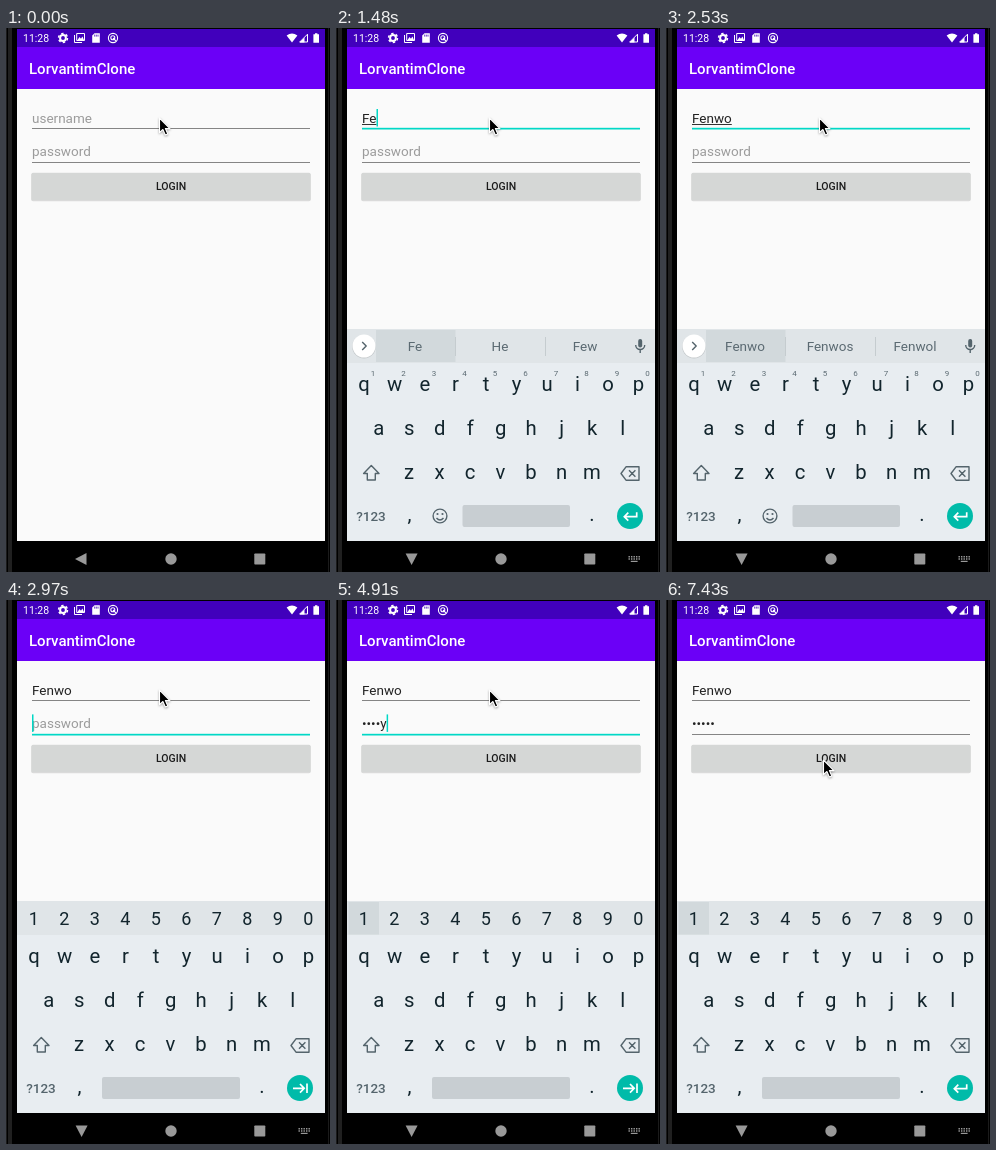
An HTML page that plays this animation: 324 by 544 pixels, repeating every 8 s.

```html
<!DOCTYPE html>
<html lang="en">
<head>
<meta charset="utf-8">
<title>Login form</title>
<style>
  html, body { margin: 0; width: 100%; height: 100%; overflow: hidden; background: #000; }
  svg { display: block; width: 324px; height: 544px; font-family: Roboto, sans-serif; }
  .mid { text-anchor: middle; }
  .key { font-size: 20.3px; fill: #12252d; text-anchor: middle; }
  .num { font-size: 18px; fill: #12252d; text-anchor: middle; }
  .sup { font-size: 8px; fill: #5b6a72; text-anchor: middle; }
  .word { font-size: 13.5px; fill: #5b6a72; text-anchor: middle; }
  .field { font-size: 13.5px; }
  .line { fill: none; stroke: #54646c; stroke-width: 1.4; stroke-linejoin: round; }
  #mouse { filter: drop-shadow(.5px 1px .8px rgba(0, 0, 0, .35)); }
</style>
</head>
<body>
<svg viewBox="0 0 324 544" xmlns="http://www.w3.org/2000/svg">
  <!-- device and bars -->
  <rect width="324" height="544" fill="#000"/>
  <path d="M.5 0V544M322.5 0V544" stroke="#1b1b1b"/>
  <rect x="2" width="4" height="544" fill="#202020"/>
  <rect x="11" y="1" width="308" height="512" fill="#fafafa"/>
  <rect x="11" y="1" width="308" height="18" fill="#4100bc"/>
  <rect x="11" y="19" width="308" height="42" fill="#6b00f7"/>
  <text x="23" y="46" font-size="15" font-weight="500" fill="#fff">LorvantimClone</text>

  <!-- status icons -->
  <g fill="#fff">
    <text x="17" y="14" font-size="10.5">11:28</text>
    <circle cx="57" cy="10" r="2.9" fill="none" stroke="#fff" stroke-width="2"/>
    <circle cx="57" cy="10" r="4.5" fill="none" stroke="#fff" stroke-width="1.4" stroke-dasharray="2.4 2.312"/>
    <path d="M68.5 7V14.5H76" fill="none" stroke="#fff"/>
    <path d="M70.7 5.5H78.5V12.5H70.7Z" fill="none" stroke="#fff"/>
    <path d="M71.5 12L73.5 9L75 10.7L76.4 8.5L78 12Z"/>
    <path d="M88.5 5.3H93.8V14.7H86.2V7.6Z"/>
    <path d="M88.7 6.6V8.6M90.3 6.6V8.6M92 6.6V8.6" stroke="#4100bc" stroke-width=".8"/>
    <g fill="none" stroke="#fff" stroke-width="1.1">
      <circle cx="107" cy="10" r="4.6"/>
      <circle cx="106.8" cy="9.8" r="2"/>
      <path d="M107 10L110.2 13.2"/>
    </g>
    <path d="M280.6 7.5Q286 3.4 291.4 7.5L286 14.5Z"/>
    <path d="M293.7 14L301.5 6.2V14Z" fill="none" stroke="#fff"/>
    <path d="M293.5 14.4L298.5 9.4V14.4Z"/>
    <path d="M309 5.2H311.4V6.2H313V14.7H307.4V6.2H309Z"/>
  </g>

  <!-- form -->
  <rect id="userLine" x="26" width="278"/>
  <rect id="passLine" x="26" width="278"/>
  <text id="user" class="field" x="26" y="94.6"/>
  <text id="pass" class="field" x="26" y="128"/>
  <rect id="compose" x="26" y="96" height="1" fill="#333"/>
  <rect id="caret" width="1.5" height="17.5" fill="#00d8c6"/>
  <rect x="25.2" y="145.3" width="279.6" height="28" rx="1.8" fill="#000" opacity=".13"/>
  <rect id="button" x="25.5" y="144.7" width="279" height="27.5" rx="1.5"/>
  <text class="mid" x="165" y="162" font-size="10.5" font-weight="500" fill="#1b1b1b">LOGIN</text>

  <!-- keyboard -->
  <g id="board">
    <rect x="11" y="301" width="308" height="212" fill="#e8edf1"/>
    <rect x="11" y="301" width="308" height="34" fill="#e0e5e8"/>
    <g id="words">
      <rect x="40" y="302" width="79.5" height="32" fill="#d2d9dc"/>
      <path d="M119.5 309V328M209.5 309V328" stroke="#c5cccf"/>
      <circle cx="28" cy="318.7" r="11.8" fill="#000" opacity=".12"/>
      <circle cx="28" cy="318" r="11.5" fill="#fff"/>
      <path class="line" d="M26.2 314L30.2 318L26.2 322"/>
      <rect x="302.2" y="311" width="4" height="8.5" rx="2" fill="#54646c"/>
      <path class="line" d="M299.7 317A4.5 4.5 0 0 0 308.7 317M304.2 321.5V325"/>
    </g>
    <g id="nums"><rect id="one" x="12.5" y="302" width="30.5" height="32.5" fill="#d2d9dc"/></g>
    <g id="keys"></g>
    <path class="line" d="M35.3 437.5L43 445.5H39.3V452H31.3V445.5H27.6Z"/>
    <path class="line" d="M285 445.5L290 438.8H303V452.2H290ZM293 442.3L299.4 448.7M299.4 442.3L293 448.7"/>
    <text class="mid" x="35" y="493" font-size="13.5" font-weight="500" fill="#54646c">?123</text>
    <text class="key" x="73.5" y="493">,</text>
    <text class="key" x="256" y="493">.</text>
    <g id="smile">
      <circle class="line" cx="104" cy="488" r="6.9"/>
      <path class="line" d="M100.5 490Q104 494 107.5 490"/>
      <circle cx="101.5" cy="486" r="1.1" fill="#54646c"/>
      <circle cx="106.5" cy="486" r="1.1" fill="#54646c"/>
    </g>
    <rect id="space" y="477" height="22" rx="2" fill="#c8ced2"/>
    <circle cx="294" cy="488" r="13" fill="#00bba9"/>
    <path id="action" fill="none" stroke="#fff" stroke-width="1.7"/>
  </g>

  <!-- navigation bar -->
  <g fill="#999">
    <path id="back" d="M69 531L80.5 525V537Z"/>
    <circle cx="165" cy="531" r="5.7"/>
    <rect x="248.3" y="525.5" width="11" height="11" rx=".8"/>
    <g id="picker">
      <path d="M292.5 528.7H304M292.5 531H304" stroke="#999" stroke-width="1.4" stroke-dasharray="1.4 1.1"/>
      <path d="M294.8 533.4H301.6" stroke="#999" stroke-width="1.2"/>
    </g>
  </g>

  <path id="mouse" d="M0 0V14.6L3.4 11.5L5.8 17L8.3 15.9L5.9 10.6H10.4Z" fill="#000" stroke="#fff" stroke-width="1.1" stroke-linejoin="round"/>
</svg>
<script>
const LOOP = 8000;
const $ = id => document.getElementById(id);

function label(parent, cls, x, y, str) {
  const el = document.createElementNS("http://www.w3.org/2000/svg", "text");
  el.setAttribute("class", cls);
  el.setAttribute("x", x);
  el.setAttribute("y", y);
  el.textContent = str;
  parent.append(el);
  return el;
}

function set(id, attrs) {
  for (const k in attrs) $(id).setAttribute(k, attrs[k]);
}

function show(id, on) {
  $(id).style.display = on ? "" : "none";
}

// keyboard letters and digits
const STEP = 30.5;
[["qwertyuiop", 28, 363], ["asdfghjkl", 42.7, 407], ["zxcvbnm", 73, 451]].forEach(([row, x, y]) =>
  [...row].forEach((c, i) => label($("keys"), "key", x + i * STEP, y, c)));
[..."1234567890"].forEach((c, i) => {
  label($("nums"), "num", 27.7 + i * STEP, 325, c);
  label($("words"), "sup", 37 + i * STEP, 348, c);
});
const hints = [79, 164, 249].map(x => label($("words"), "word", x, 323, ""));

// each cue changes part of the state and holds until the next
const cues = [
  [0, { user: "", pass: "", focus: "", caret: false, mode: "", picker: false, one: false, button: "#d5d7d6" }],
  [590, { focus: "user", caret: true }],
  [1040, { caret: false }],
  [1190, { picker: true }],
  [1330, { caret: true }],
  [1480, { user: "Fe", mode: "words", words: ["Fe", "He", "Few"] }],
  [1630, { user: "Fen", words: ["Fen", "Hen", "Fenwo"] }],
  [1780, { user: "Fenw", words: ["Fenw", "Fen", "Fenwo"] }],
  [2080, { user: "Fenwo", words: ["Fenwo", "Fenwos", "Fenwol"] }],
  [2530, { caret: false }],
  [2970, { focus: "pass", caret: true, mode: "nums" }],
  [3570, { caret: false }],
  [4020, { caret: true, one: true }],
  [4170, { pass: "d" }],
  [4470, { pass: "•i" }],
  [4620, { pass: "••l" }],
  [4770, { pass: "•••w" }],
  [4910, { pass: "••••y" }],
  [5360, { caret: false }],
  [5510, { pass: "•••••", focus: "login", button: "#c4c6c5" }],
  [7290, { button: "#cccecd" }],
  [7430, { button: "#d5d7d6" }]
];

function field(id, hint, value, focused, y) {
  const el = $(id);
  el.textContent = value || hint;
  el.setAttribute("fill", value ? "#222" : "#9b9b9b");
  set(id + "Line", focused
    ? { y: y - 0.2, height: 1.7, fill: "#00d8c6" }
    : { y, height: 1, fill: "#858585" });
  return value ? el.getComputedTextLength() : 0;
}

function pointer(t) {
  if (t < 6110) return [153.5, 90];
  const p = Math.min(1, Math.floor((t - 6110) / 147) / 7);
  const e = p * p * (3 - 2 * p);
  return [153.5 + 4 * e, 104.5 + 55.5 * e];
}

function draw(t) {
  const s = {};
  for (const [at, change] of cues) if (at <= t) Object.assign(s, change);

  const onUser = s.focus === "user", onPass = s.focus === "pass";
  const userEnd = field("user", "username", s.user, onUser, 100);
  const passEnd = field("pass", "password", s.pass, onPass, 134);
  set("caret", { x: 26 + (onUser ? userEnd : passEnd), y: onUser ? 81 : 114.4 });
  show("caret", s.caret);
  set("compose", { width: userEnd });
  show("compose", onUser && s.user);
  set("button", { fill: s.button });

  const emoji = s.mode === "words";
  show("board", s.mode);
  show("words", emoji);
  show("smile", emoji);
  show("nums", !emoji);
  show("one", s.one);
  if (emoji) hints.forEach((el, i) => el.textContent = s.words[i]);
  set("space", { x: emoji ? 126.5 : 96, width: emoji ? 107.5 : 138 });
  set("action", { d: onPass
    ? "M287 488.3H298M294 484L298.2 488.3L294 492.6M301 483.5V493"
    : "M300.7 484.3V488.7H288.5M292.3 484.7L288.3 488.7L292.3 492.7" });

  set("back", { transform: s.mode ? "rotate(-90 75.3 530.7)" : "" });
  show("picker", s.picker);
  set("mouse", { transform: `translate(${pointer(t)})` });
}

function tick() {
  draw(performance.now() % LOOP);
  requestAnimationFrame(tick);
}
tick();
</script>
</body>
</html>
```
